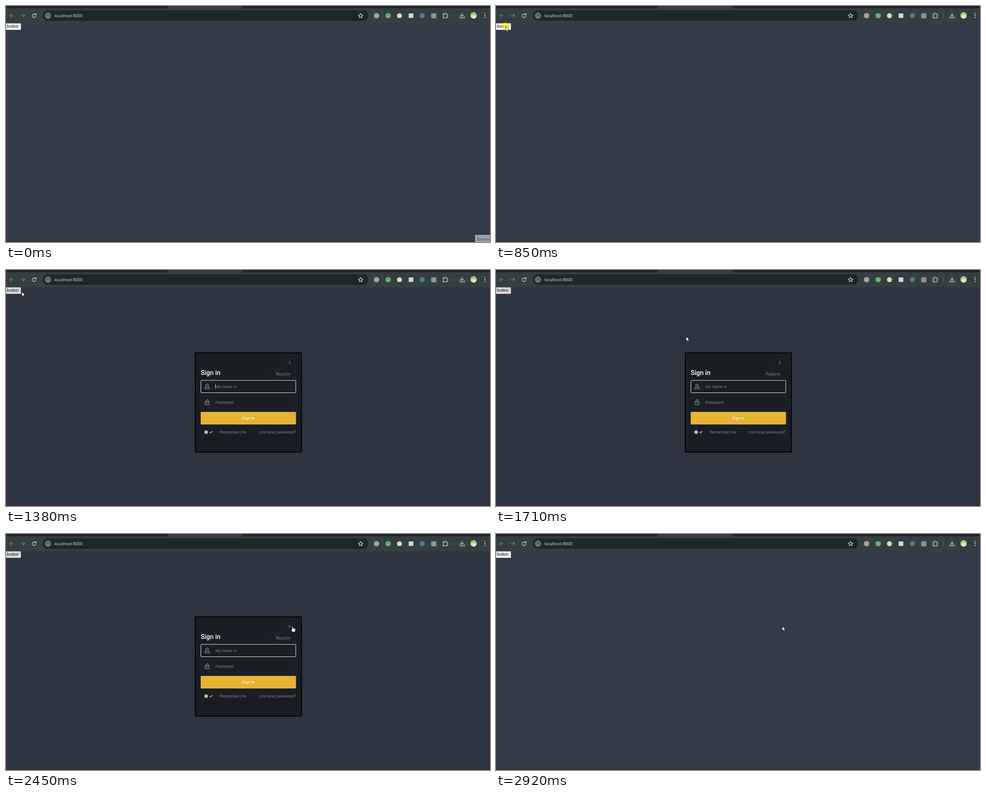
Recreate the animation shown at these times as an HTML page. Size 1069 by 524 pixels, loop 3320 ms.

```html
<!DOCTYPE html>
<html lang="en">
<head>
<meta charset="utf-8">
<title>Sign in popup</title>
<style>
  html, body { margin: 0; width: 100%; height: 100%; overflow: hidden; background: #343b48; }
  svg { display: block; width: 100%; height: 100%; }
  .ui { font: 9px Roboto, sans-serif; fill: #7e8288; }
  .form { font: 9.33px "Liberation Sans", Arial, sans-serif; }
  .bar { font: 9.2px "Open Sans", sans-serif; }
  .line { fill: none; stroke-width: 1.2; stroke-linecap: round; stroke-linejoin: round; }
  .faint { fill: none; stroke: #21262d; }
</style>
</head>
<body>
<svg viewBox="0 0 1069 524">
  <rect id="page" y="38" width="1069" height="486"/>

  <g id="toolbar">
    <rect width="1069" height="6" fill="#1d2527"/>
    <path d="M0 38.5V7Q0 5 3 5H352Q357 5 358 0H522Q523 5 528 5H1069V38.5Z" fill="#353e40"/>
    <rect x="81" y="9.5" width="719" height="23.5" rx="11.75" fill="#1e2728"/>
    <circle cx="92.7" cy="21.3" r="8.6" fill="#353e40"/>
    <g class="line" stroke="#d9dddd">
      <circle cx="92.7" cy="21.3" r="4.6"/>
      <path d="M92.7 21.2V23.6M92.7 19V19.1"/>
      <path d="M66 19.3A4.2 4.2 0 1 0 66.6 21.8M66.6 16.8V19.6H63.8"/>
      <path d="M783.3 16.4L784.8 19.7L788.4 20.1L785.7 22.5L786.5 26L783.3 24.2L780.1 26L780.9 22.5L778.2 20.1L781.8 19.7Z"/>
      <path d="M965.2 17.6H968.2A1.7 1.7 0 0 1 971.6 17.6H974.2V20.2A1.7 1.7 0 0 1 974.2 23.6V26.4H965.2V23.6A1.7 1.7 0 0 0 965.2 20.2Z"/>
      <path d="M1007.3 16V23M1004.2 20.2L1007.3 23.3L1010.4 20.2M1002.3 23.6V26.3H1012.3V23.6"/>
    </g>
    <g class="line" stroke="#7c8586">
      <path d="M16.3 21.2H8.3M12 17.3L8.1 21.2L12 25.1"/>
      <path d="M33.3 21.2H41.3M37.6 17.3L41.5 21.2L37.6 25.1"/>
    </g>
    <text class="bar" x="107" y="25" fill="#e4e7e7">localhost:8000</text>
    <circle cx="818.5" cy="21.5" r="6" fill="#a0a3a4"/>
    <circle cx="844" cy="21.5" r="6" fill="#64b077"/>
    <circle cx="869" cy="21.5" r="5.5" fill="#d5dfb0"/>
    <rect x="889.5" y="16.5" width="10" height="10" fill="#c9dbe6"/>
    <circle cx="919.5" cy="21.5" r="5.5" fill="#4b7f9c"/>
    <rect x="939" y="16" width="11.5" height="11.5" rx="2" fill="#8d9495"/>
    <path d="M988.5 16V27" stroke="#535e5f"/>
    <circle cx="1032.8" cy="21" r="7.2" fill="#a9cd73"/>
    <path d="M1027 25.2Q1029 19 1032.5 20Q1036 17 1038.6 25.2Q1033 31 1027 25.2Z" fill="#dce9c0"/>
    <g fill="#d9dddd">
      <circle cx="1058" cy="17" r="1.2"/><circle cx="1058" cy="21.2" r="1.2"/><circle cx="1058" cy="25.4" r="1.2"/>
    </g>
  </g>

  <rect id="button" y="38.5" width="33" height="14.5" rx="1"/>
  <text class="form" x="1.8" y="48.2" fill="#111">button</text>

  <g id="hint">
    <rect x="1036" y="508" width="33" height="16" fill="#a0a2a8"/>
    <text x="1039.5" y="520.8" style="font: 8.4px 'Open Sans', sans-serif" fill="#42464d">Запись</text>
  </g>

  <g id="popup" class="ui">
    <rect x="418" y="184" width="234.5" height="220" fill="#1a1e24" stroke="#000" stroke-width="2"/>
    <g class="faint">
      <rect x="613" y="196.5" width="27" height="18.5" rx="1"/>
      <rect x="585" y="221.5" width="55" height="19" rx="1"/>
      <rect x="430.5" y="280" width="209.5" height="27" rx="1.5"/>
      <path d="M455.5 246V272M455.5 280V307"/>
      <rect x="430.5" y="353" width="34.5" height="14" rx="7"/>
    </g>
    <rect id="field" x="430.5" y="245" width="209.5" height="27.5" rx="1.5" fill="none"/>
    <text x="626.5" y="209" text-anchor="middle">X</text>
    <text x="430" y="233.3" style="font-size: 14.4px; font-weight: 500" fill="#fff">Sign in</text>
    <text x="596" y="234">Register</text>
    <g class="line" stroke="#aeb1b5" style="stroke-width: 1">
      <path d="M441.3 256.2A2.9 3 0 0 1 447.1 256.2A2.9 3.3 0 0 1 441.3 256.2ZM442.5 259.3V260.3L438.9 261.8V263.8H449.6V261.8L446 260.3V259.3"/>
      <path d="M440 292.3H448.5V299H440ZM441.8 292V290.2A2.4 2.4 0 0 1 446.7 290.2V292M444.2 295V296.8"/>
    </g>
    <g class="form">
      <text x="462.3" y="261.7">My name is</text>
      <text x="462.3" y="296.6">Password</text>
    </g>
    <path id="caret" d="M462.5 253V264" stroke="#d9a930"/>
    <rect x="430" y="315" width="210.5" height="28" rx="2" fill="#e5b233"/>
    <text x="535" y="332" text-anchor="middle" style="fill: #fff">Sign in</text>
    <circle cx="442" cy="360" r="4" fill="#b9babb"/>
    <path class="line" d="M450.3 360L452 361.7L455.5 358.3" stroke="#e5b233" style="stroke-width: 1.8"/>
    <text x="472" y="362.7">Remember me</text>
    <text x="557.5" y="362.7">Lost your password?</text>
  </g>

  <circle id="press" r="8.8" fill="#fff000" opacity=".56"/>
  <g id="cursor" stroke="#15181d" stroke-width=".7" fill="#fff" stroke-linejoin="round">
    <path id="arrow" d="M0 0V9.6L2.2 7.6L3.8 11L5.5 10.2L4 7H7Z"/>
    <path id="hand" d="M-.9 .8Q0-.6 .9 .8V4.2L5.6 5.2Q6.6 5.6 6.5 7L5.6 12.6H.3L-2.9 8Q-2.6 6.5-.9 7.5Z"/>
  </g>
</svg>
<script>
const LOOP = 3320, STEP = 65;
const OPEN = 910, MOVE = 1380, BLUR = 2850, CLOSE = 2920;
// time, x, y of the pointer tip
const PATH = [
  [70, 1015, 470], [200, 760, 330], [390, 260, 140], [520, 60, 62], [590, 24, 48], [650, 21.5, 46],
  [1379, 21.5, 46], [1380, 35, 48.5], [1570, 200, 95], [1705, 420, 148], [1835, 572, 169],
  [1900, 615, 184], [1965, 635, 191.5], [2030, 639.5, 193.5], [2225, 637, 200], [2390, 633, 205], [2450, 632.3, 205]
];
const $ = id => document.getElementById(id);
const within = (t, a, b) => t >= a && t < b;
const show = (id, on) => $(id).setAttribute('visibility', on ? 'inherit' : 'hidden');

function pointer(t) {
  const i = PATH.findIndex(k => k[0] > t);
  if (i < 0) return PATH[PATH.length - 1].slice(1);
  if (i === 0) return PATH[0].slice(1);
  const [t0, x0, y0] = PATH[i - 1], [t1, x1, y1] = PATH[i];
  const p = (t - t0) / (t1 - t0);
  return [x0 + (x1 - x0) * p, y0 + (y1 - y0) * p];
}

function sample(t) {
  if (within(t, OPEN, MOVE)) return OPEN;
  const base = t < MOVE ? 0 : MOVE;
  return base + Math.floor((t - base) / STEP) * STEP;
}

function draw(t) {
  const open = within(t, OPEN, CLOSE);
  const focus = within(t, OPEN, BLUR);
  const [x, y] = pointer(sample(t));
  const hover = !open && x < 33 && y < 53;
  const hand = open && x > 613 && y > 196.5 && y < 215;
  const pressed = within(t, 780, OPEN) || within(t, BLUR, CLOSE);

  $('page').setAttribute('fill', open ? '#2d343f' : '#343b48');
  $('button').setAttribute('fill', open ? '#d7d7d7' : hover ? '#f8f8f8' : '#efefef');
  $('field').setAttribute('stroke', focus ? '#f2f2f2' : '#21262d');
  show('hint', t < 70);
  show('popup', open);
  show('caret', open && focus && Math.floor((t - OPEN) / 500) % 2 === 0);
  show('press', pressed);
  $('press').setAttribute('transform', `translate(${x - .5} ${y - .7})`);
  show('cursor', t >= 70);
  show('arrow', t >= 70 && !hand);
  show('hand', t >= 70 && hand);
  $('cursor').setAttribute('transform', `translate(${x} ${y})`);
}

function frame() {
  draw(performance.now() % LOOP);
  requestAnimationFrame(frame);
}
frame();
</script>
</body>
</html>
```
